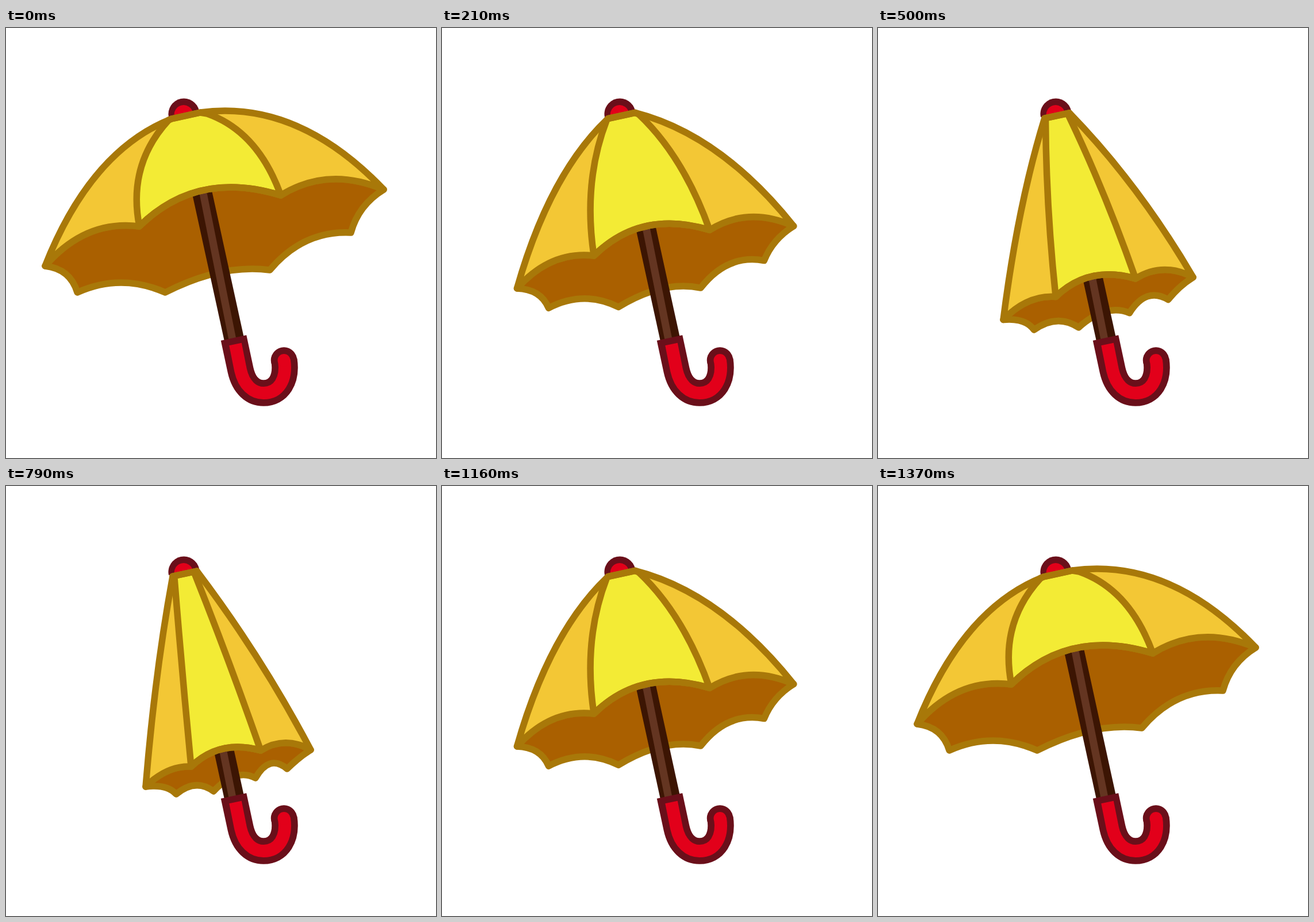
An HTML page that plays this animation: 748x748 px, repeating every 1660 ms.

```html
<!DOCTYPE html>
<html lang="en">
<head>
<meta charset="utf-8">
<title>Umbrella</title>
<style>
  html, body { margin: 0; height: 100%; overflow: hidden; background: #fff; }
  svg { display: block; width: 100%; height: 100%; }
  path { fill: none; stroke-linejoin: round; }
  .seam { stroke: #a87809; stroke-width: 11.5; stroke-linecap: round; }
  .dark { stroke: #6a0f1a; stroke-width: 45.5; }
  .red { stroke: #e2001a; stroke-width: 22; }
  .round { stroke-linecap: round; }
</style>
</head>
<body>
<svg viewBox="0 0 748 748">
  <path id="under" class="seam" style="fill:#aa6000"/>
  <path d="M331 240L397 542" stroke="#3c1503" stroke-width="34.500"/>
  <path d="M333.500 240L394 542" stroke="#643521" stroke-width="13"/>
  <path class="dark" d="M396 539L408 595C414 622 430 635 448 635C474 635 489 612 484 578"/>
  <path class="dark round" d="M483.500 578h.01"/>
  <path class="red" d="M399 550L408 595C414 622 430 635 448 635C474 635 489 612 484 578"/>
  <path class="red round" d="M483.500 578h.01"/>
  <path d="M283 155A27 27 0 0 1 336 144Z" style="fill:#6a0f1a"/>
  <path d="M293 154A16 16 0 0 1 325 147Z" style="fill:#e2001a"/>
  <path id="sides" style="fill:#f3c735"/>
  <path id="middle" class="seam" style="fill:#f3eb35"/>
  <path id="rim" class="seam"/>
</svg>
<script>
// Each point: x, y when open, then x, y when closed.
const points = {
  topL: [288, 158, 290, 157], topR: [338, 147, 332, 148],
  bowL: [147, 214, 259, 325], bowR: [507, 124, 444, 296],
  tipL: [68, 414, 243, 523], tipR: [657, 281, 530, 459],
  ribL: [283, 160, 293, 160], ribR: [350, 149, 328, 152],
  bendL: [211, 238, 306, 322], bendR: [438, 180, 387, 300],
  footL: [232, 345, 322, 488], footR: [478, 291, 443, 460],
  front1: [138, 333, 280, 486], front2: [332, 246, 372, 440], front3: [560, 240, 485, 434],
  arc1: [112, 419, 280, 518], back1: [124, 460, 296, 536],
  arc2: [200, 426, 330, 508], back2: [277, 460, 361, 531],
  arc3: [375, 410, 400, 490], back3: [459, 421, 434, 508],
  arc4: [517, 352, 458, 466], back4: [600, 356, 489, 492],
  arc5: [613, 308, 508, 473]
};
const hem = "tipL Q front1 footL Q front2 footR Q front3 tipR";
const canopy = `M ${hem} Q bowR topR L topL Q bowL tipL Z`;
const outlines = {
  under: `M ${hem} Q arc5 back4 Q arc4 back3 Q arc3 back2 Q arc2 back1 Q arc1 tipL Z`,
  sides: canopy,
  middle: "M ribL Q bendL footL Q front2 footR Q bendR ribR L topR L topL Z",
  rim: canopy
};
const STEPS = 14, REOPEN = 19, LOOP = 1660;

// Six steps fill 250 ms; the fifth of them lasts 50 ms, the others 40 ms.
function stepAt(t) {
  const rest = t % 250;
  return 6 * Math.floor(t / 250) + (rest < 210 ? Math.min(4, Math.floor(rest / 40)) : 5);
}

function closedness(step) {
  const steps = step < REOPEN ? step : REOPEN + STEPS - step;
  return Math.max(0, Math.min(1, steps / STEPS));
}

function draw(p) {
  const place = name => {
    const [x0, y0, x1, y1] = points[name];
    return `${x0 + (x1 - x0) * p} ${y0 + (y1 - y0) * p}`;
  };
  for (const id in outlines) {
    const d = outlines[id].replace(/[a-z]\w+/g, place);
    document.getElementById(id).setAttribute("d", d);
  }
}

const start = performance.now();
function tick() {
  draw(closedness(stepAt((performance.now() - start) % LOOP)));
  requestAnimationFrame(tick);
}
tick();
</script>
</body>
</html>
```
